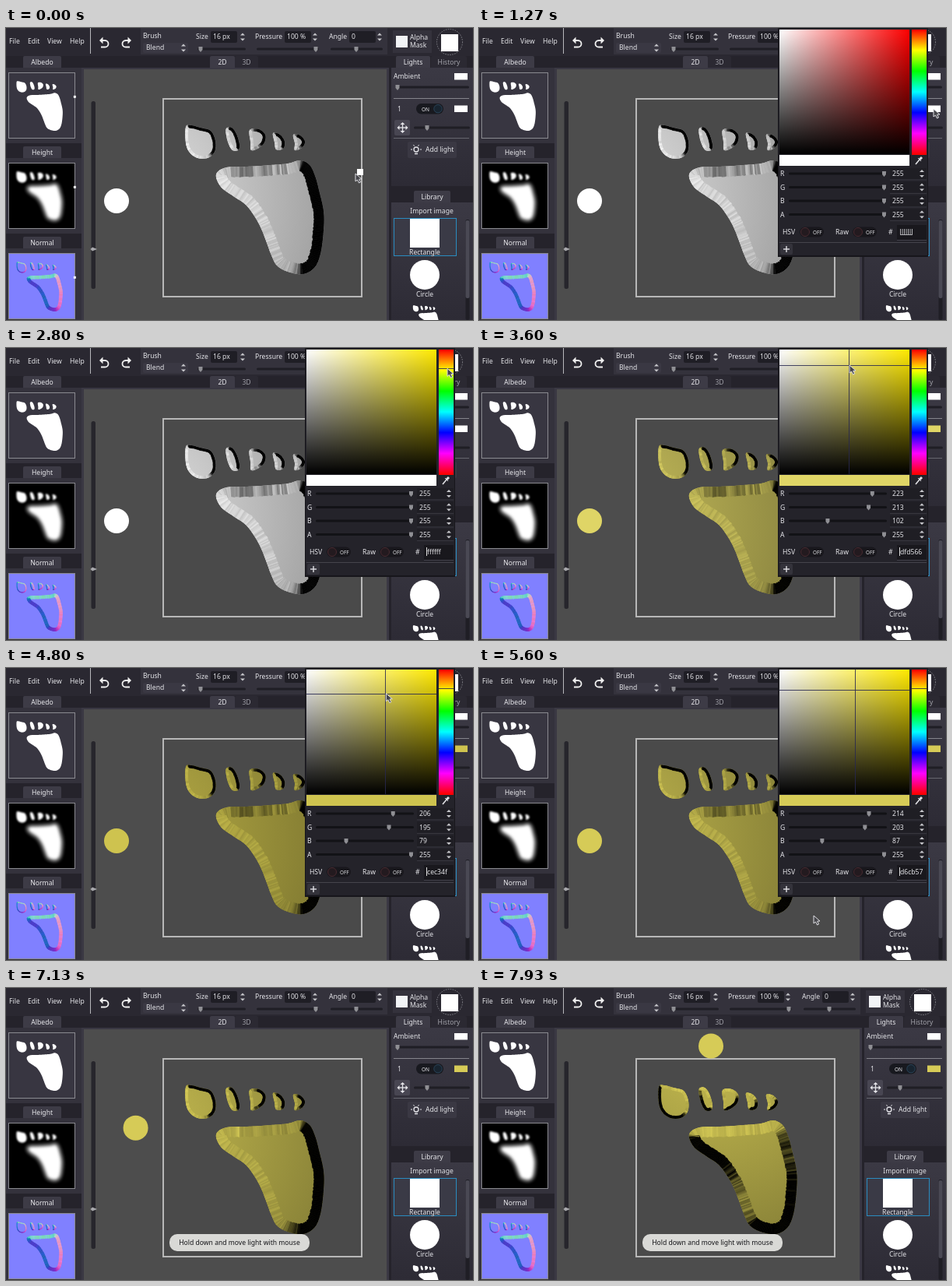
An HTML page with a canvas that plays this animation: 600 by 375 pixels, repeating every 8 s.

```html
<!DOCTYPE html>
<html lang="en">
<head>
<meta charset="utf-8">
<title>Light colour in a normal map painter</title>
<style>
html, body { margin: 0; width: 100%; height: 100%; overflow: hidden; background: #25232b; }
canvas { display: block; width: 600px; height: 375px; }
</style>
</head>
<body>
<canvas id="stage" width="600" height="375"></canvas>
<script>
const LOOP = 8000, OPEN = 1200, CLOSE = 5700, HOLD = 6800;
const screen = document.getElementById('stage').getContext('2d');
let g = screen;

// ---------- helpers ----------
const clamp = (v, a, b) => Math.min(b, Math.max(a, v));
const rgb = c => `rgb(${c.map(Math.round).join()})`;

function rand(seed) {
  const s = Math.sin(seed * 127.1) * 43758.5453;
  return s - Math.floor(s);
}

function rect(x, y, w, h, fill) {
  g.fillStyle = fill;
  g.fillRect(x, y, w, h);
}

function frame(x, y, w, h, color, width = 1) {
  g.strokeStyle = color;
  g.lineWidth = width;
  g.strokeRect(x, y, w, h);
}

function round(x, y, w, h, r, fill) {
  g.fillStyle = fill;
  g.beginPath();
  g.roundRect(x, y, w, h, r);
  g.fill();
}

function disc(x, y, r, fill) {
  g.fillStyle = fill;
  g.beginPath();
  g.arc(x, y, r, 0, 7);
  g.fill();
}

function line(color, width, ...p) {
  g.strokeStyle = color;
  g.lineWidth = width;
  g.beginPath();
  for (let i = 0; i < p.length; i += 2) g.lineTo(p[i], p[i + 1]);
  g.stroke();
}

function poly(fill, ...p) {
  g.fillStyle = fill;
  g.beginPath();
  for (let i = 0; i < p.length; i += 2) g.lineTo(p[i], p[i + 1]);
  g.closePath();
  g.fill();
}

function fade(x0, y0, x1, y1, stops) {
  const gr = g.createLinearGradient(x0, y0, x1, y1);
  stops.forEach((c, i) => gr.addColorStop(i / (stops.length - 1), c));
  return gr;
}

function text(s, x, y, align = 'left', color = '#e4e4e8', size = 8.6) {
  g.font = `${size}px "Noto Sans", "Open Sans", sans-serif`;
  g.textAlign = align;
  g.textBaseline = 'alphabetic';
  g.fillStyle = color;
  g.fillText(s, x, y + 3);
}

// Smooth value between [time, x, y] keys.
function along(keys, t) {
  let i = 0;
  while (i < keys.length - 2 && t > keys[i + 1][0]) i++;
  const [t0, x0, y0] = keys[i], [t1, x1, y1] = keys[i + 1];
  const u = clamp((t - t0) / (t1 - t0), 0, 1), e = u * u * (3 - 2 * u);
  return [x0 + (x1 - x0) * e, y0 + (y1 - y0) * e];
}

// ---------- footprint ----------
function outline(p, width, steps) {
  const n = p.length / 2, pts = [];
  const at = (i, k) => p[((i + n) % n) * 2 + k];
  for (let i = 0; i < n; i++) for (let s = 0; s < steps; s++) {
    const u = s / steps;
    pts.push([0, 1].map(k => {
      const a = at(i - 1, k), b = at(i, k), c = at(i + 1, k), d = at(i + 2, k);
      return b + u * (c - a + u * (2 * a - 5 * b + 4 * c - d + u * (3 * (b - c) + d - a))) / 2;
    }));
  }
  const m = pts.length;
  const rim = pts.map(([x, y], i) => {
    const a = pts[(i - 3 + m) % m], b = pts[(i + 3) % m];
    const dx = b[0] - a[0], dy = b[1] - a[1], len = Math.hypot(dx, dy) || 1;
    const depth = width * (0.95 + 0.1 * rand(i + width));
    const nx = dy / len, ny = -dx / len;
    return { x, y, nx, ny, ix: x - nx * depth, iy: y - ny * depth, noise: rand(i * 3 + n) - 0.5 };
  });
  const path = new Path2D();
  pts.forEach(q => path.lineTo(...q));
  path.closePath();
  return { path, rim };
}

const toes = [
  [231, 127, 238, 125, 250, 128, 263, 132, 269, 145, 268, 159, 259, 167, 246, 167, 236, 160, 231, 148],
  [283, 129, 290, 128, 296, 136, 300, 150, 298, 157, 291, 157, 286, 149, 283, 138],
  [313, 131, 325, 130, 333, 137, 332, 147, 325, 154, 315, 157, 314, 146],
  [343, 135, 352, 137, 358, 146, 356, 155, 347, 156, 345, 147],
  [369, 137, 378, 138, 384, 146, 380, 154, 371, 157, 371, 148]
].map(p => outline(p, 3.4, 6));

const sole = outline([
  270, 188, 283, 179, 310, 178, 340, 176, 362, 174, 378, 170, 390, 176, 397, 190, 402, 208,
  408, 235, 408, 260, 404, 290, 396, 308, 381, 316, 362, 313, 348, 305, 341, 292, 335, 276,
  328, 258, 320, 243, 308, 227, 292, 216, 276, 204
], 13, 12);

const shapes = [...toes, sole];

function bevel({ path, rim }, shade) {
  g.save();
  g.clip(path);
  g.lineWidth = 0.7;
  rim.forEach((a, i) => {
    const b = rim[(i + 1) % rim.length], c = shade(a);
    poly(c, a.x, a.y, b.x, b.y, b.ix, b.iy, a.ix, a.iy);
    g.strokeStyle = c;
    g.stroke();
  });
  g.restore();
}

function inThumb(top, draw) {
  g.save();
  g.beginPath();
  g.rect(4, top, 85, 84);
  g.clip();
  g.translate(4, top);
  g.scale(1 / 3, 1 / 3);
  g.translate(-202, -91);
  draw();
  g.restore();
}

const flatLight = d => Math.max(0, 0.93 - 0.0011 * d);

function litFoot(lx, ly, color) {
  const tint = k => rgb(color.map(c => c * clamp(k, 0, 1)));
  const glow = g.createRadialGradient(lx, ly, 0, lx, ly, 500);
  glow.addColorStop(0, tint(flatLight(0)));
  glow.addColorStop(1, tint(flatLight(500)));
  for (const s of shapes) {
    g.fillStyle = glow;
    g.fill(s.path);
    bevel(s, a => {
      const dx = lx - a.x, dy = ly - a.y, d = Math.hypot(dx, dy);
      const dot = (a.nx * dx + a.ny * dy) / d, base = flatLight(d);
      if (dot > 0) return tint(base + 0.1 * dot + 0.14 * a.noise);
      const dark = Math.max(0, -dot - 0.1) / 0.42;
      return tint(base * (1 - dark + (dark < 1.2 ? 0.5 * a.noise : 0)));
    });
  }
}

// ---------- widgets ----------
const BG = '#25232b', PANEL = '#34323c', BUTTON = '#3a3843', DARK = '#1f1e25';

function panel(x, y, w, h) {
  rect(x, y, w, h, fade(0, y, 0, y + h, ['#3b3944', '#2d2b35']));
}

function knob(x, y) {
  poly('#8f8f94', x - 2.5, y - 3, x + 2.5, y - 3, x + 2.5, y + 1, x, y + 4, x - 2.5, y + 1);
}

function slider(x0, x1, y, at) {
  round(x0, y - 1.5, x1 - x0, 3, 1.5, DARK);
  knob(at, y);
}

function spinner(x, y) {
  poly('#c8c8cc', x - 3, y - 2, x, y - 5, x + 3, y - 2);
  poly('#c8c8cc', x - 3, y + 2, x, y + 5, x + 3, y + 2);
}

function tab(name, x, w, y, active = true) {
  round(x, y, w, 16, [2, 2, 0, 0], active ? '#3d3b46' : '#2b2932');
  text(name, x + w / 2, y + 7.7, 'center', active ? '#e8e8ec' : '#a0a0a8');
}

function bend(x, dir) {
  const p = k => x + k * dir;
  g.strokeStyle = '#f0f0f0';
  g.lineWidth = 1.8;
  g.beginPath();
  g.moveTo(p(-3), 16);
  g.lineTo(p(1), 16);
  g.bezierCurveTo(p(7), 16, p(7), 24.5, p(1), 24.5);
  g.lineTo(p(-4), 24.5);
  g.stroke();
  poly('#f0f0f0', p(-6), 16, p(-1.5), 11.5, p(-1.5), 20.5);
}

function topBar() {
  rect(0, 0, 600, 36, '#2a2831');
  ['File', 'Edit', 'View', 'Help'].forEach((s, i) => text(s, [4, 28, 53, 82][i], 17));
  line('#b8b8bc', 1, 108.5, 0, 108.5, 33);
  bend(126, 1);
  bend(155, -1);
  rect(173, 0, 317, 34, PANEL);
  text('Brush', 176, 10);
  round(176, 19, 58, 13, 2, BUTTON);
  text('Blend', 180, 25);
  spinner(228, 25.5);
  const fields = [['Size', 244, '16 px', 266, 304, 308, 250],
    ['Pressure', 320, '100 %', 361, 397, 402, 398], ['Angle', 415, '0', 444, 480, 484, 450]];
  for (const [name, x, value, vx, sx, end, at] of fields) {
    text(name, x, 11);
    round(vx - 3, 4, 34, 15, 2, DARK);
    text(value, vx, 11);
    spinner(sx, 11.5);
    slider(x + 2, end, 27, at);
  }
  rect(497, 3, 50, 29, PANEL);
  rect(501, 10, 15, 15, '#f2f4f6');
  text('Alpha', 519, 12);
  text('Mask', 519, 22);
  disc(570, 18, 16.5, '#2a2831');
  g.setLineDash([1.5, 1.5]);
  g.strokeStyle = '#85858c';
  g.lineWidth = 1;
  g.stroke();
  g.setLineDash([]);
  rect(559, 8, 22, 22, '#fff');
}

function thumbs() {
  const tops = [57, 173, 289];
  ['Albedo', 'Height', 'Normal'].forEach((name, i) => {
    const y = tops[i];
    tab(name, 22, 49, y - 21);
    rect(0, y - 6, 97, 97, PANEL);
    rect(4, y, 85, 84, ['#383641', '#000', '#8080ff'][i]);
  });
  inThumb(57, () => {
    g.fillStyle = '#fff';
    shapes.forEach(s => g.fill(s.path));
  });
  inThumb(173, () => {
    g.fillStyle = '#fff';
    g.filter = 'blur(0.8px)';
    toes.forEach(s => g.fill(s.path));
    g.filter = 'blur(2px)';
    g.fill(sole.path);
    g.strokeStyle = 'rgba(0,0,0,.5)';
    g.lineWidth = 9;
    g.stroke(sole.path);
    g.filter = 'none';
  });
  inThumb(289, () => shapes.forEach(s => bevel(s, a =>
    rgb([132 + 112 * a.nx, 132 - 92 * a.ny, 190 + 50 * a.noise]))));
  tops.forEach(y => frame(3.5, y + 0.5, 85, 84, '#8a8a90'));
}

function viewport() {
  tab('2D', 262, 32, 36);
  tab('3D', 294, 30, 36, false);
  rect(97, 51, 395, 324, '#3a3843');
  rect(100, 53, 389, 322, '#4d4d4d');
  round(109.5, 94, 5.5, 241, 2.5, '#27262c');
  poly('#a8a8ac', 108.5, 284, 111, 281.5, 117, 284, 111, 286.5);
  rect(202, 91, 255, 254, '#4a4a4a');
  frame(202, 91, 255, 254, '#b8b8b8', 2);
}

function moveIcon(x, y) {
  line('#e4e4e8', 1.3, x - 6, y, x + 6, y);
  line('#e4e4e8', 1.3, x, y - 6, x, y + 6);
  for (let i = 0; i < 4; i++) {
    g.save();
    g.translate(x, y);
    g.rotate(i * Math.PI / 2);
    poly('#e4e4e8', 7, 0, 4, -3, 4, 3);
    g.restore();
  }
}

function sidePanel() {
  tab('Lights', 501, 44, 36);
  tab('History', 546, 46, 36, false);
  panel(495, 51, 105, 152);
  text('Ambient', 498, 62);
  rect(576, 58, 17, 8.5, '#fff');
  slider(502, 595, 76, 503);
  line('#85858c', 1, 498, 90.5, 595, 90.5);
  text('1', 503, 104);
  round(527, 97, 35, 13.5, 6.5, '#18191f');
  text('ON', 534, 104, 'left', '#e8e8ec', 6.5);
  disc(555, 103.7, 5.2, '#18242f');
  g.strokeStyle = '#2a4358';
  g.lineWidth = 1;
  g.stroke();
  round(499, 118, 20, 20, 2, '#484652');
  moveIcon(509.5, 128);
  slider(524, 596, 128, 541);
  line('#66666e', 1, 498, 141.5, 595, 141.5);
  round(516, 146, 63, 21, 2, BUTTON);
  text('Add light', 539, 156);
  disc(527, 156, 3, BUTTON);
  g.strokeStyle = '#e4e4e8';
  g.lineWidth = 1.3;
  g.stroke();
  line('#e4e4e8', 1.5, 525, 161.5, 529, 161.5);
  for (let a = -3; a <= 0; a++) {
    const c = Math.cos(a * Math.PI / 3), s = Math.sin(a * Math.PI / 3);
    line('#e4e4e8', 1, 527 + 5 * c, 156 + 5 * s, 527 + 7 * c, 156 + 7 * s);
  }

  tab('Library', 524, 47, 209);
  panel(495, 224, 105, 151);
  round(516, 228, 62, 14, 2, BUTTON);
  text('Import image', 547, 235, 'center');
  rect(499, 245, 79, 48, '#3a3a46');
  frame(498.5, 244.5, 80, 48, '#2a8cc0');
  rect(519, 245, 38, 37, '#fff');
  text('Rectangle', 538, 288, 'center');
  disc(538, 317, 19, '#fff');
  text('Circle', 538, 342, 'center');
  g.save();
  g.translate(480, 333);
  g.scale(0.186, 0.186);
  g.fillStyle = '#fff';
  shapes.forEach(s => g.fill(s.path));
  g.restore();
  round(590.5, 246, 5, 129, 2, DARK);
  round(590.5, 247, 5, 100, 2, '#4a4954');
}

// ---------- colour picker ----------
function hsv(h, s, v) {
  return [5, 3, 1].map(n => {
    const k = (n + h / 60) % 6;
    return Math.round(255 * v * (1 - s * Math.max(0, Math.min(k, 4 - k, 1))));
  });
}

function picker({ hue, hueY, x, y, picked, color }, t) {
  rect(384, 0, 193, 294, '#17161b');
  rect(385, 1, 191, 291, '#24232a');
  rect(386, 2, 167, 160, fade(386, 0, 553, 0, ['#fff', rgb(hsv(hue, 1, 1))]));
  rect(386, 2, 167, 160, fade(0, 2, 0, 162, ['rgba(0,0,0,0)', '#000']));
  rect(556, 2, 19, 161, fade(0, 2, 0, 162, [0, 60, 120, 180, 240, 300, 360].map(h => rgb(hsv(h % 360, 1, 1)))));
  const ink = 'rgba(40,40,80,.85)';
  if (hue) line(ink, 1, 556, Math.round(hueY) + 0.5, 575, Math.round(hueY) + 0.5);
  if (picked) {
    line(ink, 1, 386, Math.round(y) + 0.5, 553, Math.round(y) + 0.5);
    line(ink, 1, Math.round(x) - 0.5, 2, Math.round(x) - 0.5, 162);
  }
  rect(386, 163, 167, 14, rgb(color));
  line('#e0e0e4', 1.6, 561, 175, 566, 169);
  line('#e0e0e4', 3, 566, 169, 569, 166);
  line('#e0e0e4', 1, 564, 167, 568, 171);

  [...color, 255].forEach((v, i) => {
    const row = 187 + 17.5 * i;
    text('RGBA'[i], 387, row);
    round(398, row - 1.5, 126, 3, 1.5, '#121216');
    knob(399.6 + v * 0.474, row);
    rect(528, row - 7, 47, 14, '#1f1e24');
    line('#37363e', 1, 528, row + 8, 575, row + 8);
    text(v, 531, row);
    spinner(569, row);
  });

  [['HSV', 390, 412], ['Raw', 458, 480]].forEach(([name, lx, px]) => {
    text(name, lx, 262);
    round(px, 255.5, 31, 13, 6.5, '#18171c');
    disc(px + 7, 262, 5.5, '#231a1f');
    g.strokeStyle = '#482a30';
    g.lineWidth = 1;
    g.stroke();
    text('OFF', px + 17, 262, 'left', '#e0e0e4', 6.3);
  });
  text('#', 526, 262);
  rect(537, 253, 38, 19, '#19181d');
  line('#42414a', 1, 537, 272.5, 575, 272.5);
  if (t < 1900) {
    for (let i = 0; i < 7; i++) rect(541 + i * 2.5, 258, 1, 8, '#b0b0b4');
    rect(541, 265, 16, 1, '#b0b0b4');
  } else {
    text(color.map(c => c.toString(16).padStart(2, '0')).join(''), 541, 262);
    rect(540, 256, 1, 11, '#ddd');
  }
  line('#45444c', 1, 386, 275.5, 575, 275.5);
  round(387, 277, 16, 14, 2, '#34333b');
  line('#e0e0e4', 1.4, 391, 284, 399, 284);
  line('#e0e0e4', 1.4, 395, 280, 395, 288);
}

// ---------- motion ----------
const pointer = [
  [0, 449, 187], [200, 455, 181], [870, 583, 103], [1000, 584, 104], [2050, 584, 104],
  [2400, 570, 55], [2750, 567, 26.36], [3000, 567, 26.36], [3250, 468, 18], [3600, 476.07, 22.08],
  [4300, 480, 25], [4800, 488.34, 32.75], [5050, 484, 28], [5250, 484, 28], [5600, 430, 318],
  [5750, 430, 318], [6120, 475, 180], [6200, 503, 172], [6500, 509, 128], [6600, 509, 128]
];
const lamp = [[6850, 142, 222], [7300, 178, 160], [7900, 298, 74.5]];

function pick(t) {
  const hueY = along(pointer, clamp(t, 2400, 2900))[1];
  const hue = t < 2350 ? 0 : (hueY - 2) / 160 * 360;
  const picked = t >= 3180;
  const [x, y] = picked ? along(pointer, clamp(t, 3180, 5200)) : [386, 2];
  const color = hsv(hue, clamp((x - 386) / 166, 0, 1), clamp(1 - (y - 2) / 160, 0, 1));
  return { hue, hueY, x, y, picked, color };
}

function brushAt(t) {
  if (t < CLOSE) {
    const [x, y] = along(pointer, Math.min(t, 420));
    return [Math.min(x + 6, 484), y - 2];
  }
  return along(pointer, Math.min(t, 6120));
}

function arrow(x, y) {
  g.beginPath();
  for (const [dx, dy] of [[0, 0], [0, 10], [2.5, 8], [4.5, 12], [6.5, 11], [4.7, 7.2], [8, 7]]) g.lineTo(x + dx, y + dy);
  g.closePath();
  g.fillStyle = '#45454a';
  g.fill();
  g.strokeStyle = '#e0e0e4';
  g.lineWidth = 1;
  g.stroke();
}

function resize(x, y) {
  for (const d of [-1, 1]) {
    poly('#e8f2f4', x + 8 * d, y, x + 3 * d, y - 3.5, x + 3 * d, y + 3.5);
    g.strokeStyle = '#34545c';
    g.lineWidth = 0.8;
    g.stroke();
  }
  line('#9fd0d8', 1.2, x, y - 3, x, y + 3);
}

const ui = document.createElement('canvas');
ui.width = 600;
ui.height = 375;
g = ui.getContext('2d');
rect(0, 0, 600, 375, BG);
topBar();
thumbs();
viewport();
sidePanel();
g = screen;

function draw(t) {
  g.drawImage(ui, 0, 0);
  const state = pick(t), [lx, ly] = along(lamp, t);
  const [px, py] = along(pointer, t);
  const open = t >= OPEN && t < CLOSE;

  litFoot(lx, ly, state.color);
  disc(lx, ly, 16, rgb(state.color));
  rect(576, 99.5, 17, 8.5, rgb(state.color));

  if (!open && t < HOLD) {
    const [bx, by] = brushAt(t);
    rect(bx - 4, by - 4, 8, 8, '#fff');
    if (bx < 464) for (const top of [57, 173, 289]) {
      rect(4 + (bx - 202) / 3 - 1.5, top + (by - 91) / 3 - 1.5, 3, 3, '#fff');
    }
  }
  if (open) picker(state, t);
  if (t >= HOLD) {
    g.globalAlpha = clamp((t - HOLD) / 150, 0, 1);
    round(210, 316, 180, 22, 10, '#d9d9d6');
    text('Hold down and move light with mouse', 300, 326.5, 'center', '#141418');
    g.globalAlpha = 1;
  } else if (t > 6180 && t < 6260) resize(503, 172);
  else arrow(px, py);
}

function tick(now) {
  draw(now % LOOP);
  requestAnimationFrame(tick);
}
draw(0);
requestAnimationFrame(tick);
</script>
</body>
</html>
```
